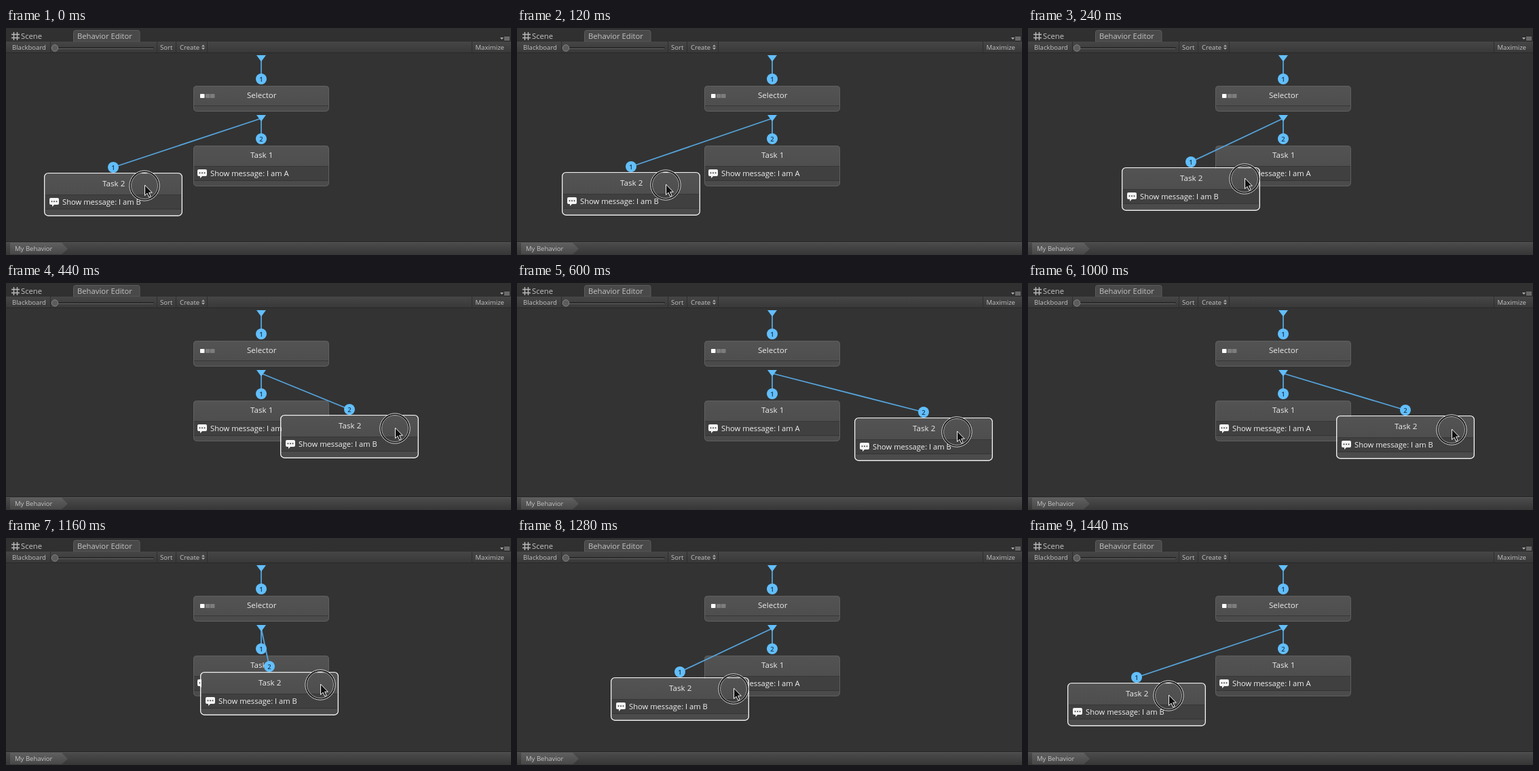
An HTML page for the animation above (1.48 s loop, 744 by 334 pixels).

```html
<!DOCTYPE html>
<html lang="en">
<head>
<meta charset="utf-8">
<title>Behavior Editor</title>
<style>
html, body { margin: 0; width: 100%; height: 100%; overflow: hidden; background: #333; }
svg { display: block; width: 744px; height: 334px; }
text { font-family: "Open Sans", "Noto Sans", sans-serif; fill: #c4c4c4; }
.tab { font-size: 11.25px; }
.bar { font-size: 9.55px; }
.title { font-size: 11.6px; fill: #ececec; text-anchor: middle; }
.msg { font-size: 11.2px; fill: #f0f0f0; }
.num { font-size: 9.5px; fill: #173a55; text-anchor: middle; font-weight: 600; }
.link { stroke: #55a4dc; stroke-width: 1.8; }
.blue { fill: #62bffc; }
</style>
</head>
<body>
<svg id="stage" viewBox="0 0 744 334">
  <defs>
    <linearGradient id="tool" x2="0" y2="1"><stop stop-color="#464646"/><stop offset="1" stop-color="#383838"/></linearGradient>
    <linearGradient id="foot" x2="0" y2="1"><stop stop-color="#4c4c4c"/><stop offset="1" stop-color="#363636"/></linearGradient>
    <linearGradient id="crumb" x2="0" y2="1"><stop stop-color="#606060"/><stop offset="1" stop-color="#484848"/></linearGradient>
    <linearGradient id="head" x2="0" y2="1"><stop stop-color="#535353"/><stop offset="1" stop-color="#4e4e4e"/></linearGradient>
  </defs>

  <rect width="744" height="334" fill="#333"/>

  <!-- tabs -->
  <rect width="744" height="20" fill="#303030"/>
  <path d="M99.500 20V6.500Q99.500 3.500 102.500 3.500H194Q197 3.500 197 6.500V20Z" fill="#494949" stroke="#5c5c5c"/>
  <path d="M11.500 6V18M16.500 6V18M8 9.500H20M8 14.500H20" stroke="#bababa" stroke-width="1.400"/>
  <text class="tab" x="22" y="16">Scene</text>
  <text class="tab" x="105" y="16">Behavior Editor</text>
  <path d="M728 14h5l-2.500 3z" fill="#b0b0b0"/>
  <path d="M734 13.500h8M734 15.500h8M734 17.500h8" stroke="#a0a0a0"/>

  <!-- toolbar -->
  <rect y="20" width="744" height="17" fill="url(#tool)"/>
  <path d="M0 36.500H744" stroke="#292929"/>
  <path d="M65.500 20V36M222.500 20V36M250.500 20V36M296.500 20V36M686.500 20V36" stroke="#2e2e2e"/>
  <rect x="67" y="28" width="151" height="2" rx="1" fill="#2b2b2b"/>
  <path d="M68 30.500H217" stroke="#606060"/>
  <circle cx="72" cy="29.500" r="4.700" fill="#5c5c5c" stroke="#868686"/>
  <text class="bar" x="9" y="32">Blackboard</text>
  <text class="bar" x="227" y="32">Sort</text>
  <text class="bar" x="256" y="32">Create</text>
  <path d="M288 27.500l2.500-3 2.500 3zM288 29h5l-2.500 3z" fill="#a8a8a8"/>
  <text class="bar" x="691.500" y="32">Maximize</text>

  <!-- breadcrumb -->
  <rect y="315" width="744" height="19" fill="url(#foot)"/>
  <path d="M0 314.500H744" stroke="#262626"/>
  <path d="M0 315.500H744" stroke="#555"/>
  <path d="M6 316H82L91 325 82 333H6Z" fill="url(#crumb)"/>
  <text class="bar" x="13" y="328">My Behavior</text>

  <g id="graph"></g>
</svg>
<script>
const LOOP = 1480, STEP = 40, TURN = 760;
const ROOT = { x: 376, y: 133 };
const graph = document.getElementById("graph");

// Drag out; the way back mirrors it. Columns: time, value.
const nodeX = track([[0, 158], [80, 160], [240, 240], [400, 446], [440, 506], [520, 556], [560, 586], [600, 599], [680, 601], [TURN, 601]]);
const nodeY = track([[0, 215], [80, 215], [240, 207], [440, 196], [520, 197], [600, 200], [TURN, 200]]);
const handX = track([[0, 204], [80, 207], [240, 319], [400, 517], [440, 573], [520, 624], [600, 648], [TURN, 649]]);
const handY = track([[0, 232], [80, 232], [240, 222], [440, 214], [520, 216], [600, 219], [TURN, 219]]);

// Monotone cubic interpolation through a few points.
function track(pts) {
  const rise = pts.slice(1).map((p, i) => (p[1] - pts[i][1]) / (p[0] - pts[i][0]));
  const slope = pts.map((p, i) => {
    const a = rise[i - 1], b = rise[i];
    return a * b > 0 ? 2 * a * b / (a + b) : 0;
  });
  return t => {
    let i = 0;
    while (i < pts.length - 2 && t > pts[i + 1][0]) i++;
    const [t0, a] = pts[i], [t1, b] = pts[i + 1];
    const d = t1 - t0, s = (t - t0) / d, r = 1 - s;
    return a * r * r * (1 + 2 * s) + b * s * s * (3 - 2 * s)
      + d * s * r * (slope[i] * r - slope[i + 1] * s);
  };
}

function el(parent, tag, attrs, text) {
  const e = document.createElementNS("http://www.w3.org/2000/svg", tag);
  for (const k in attrs) e.setAttribute(k, attrs[k]);
  if (text) e.textContent = text;
  return parent.appendChild(e);
}

const place = (e, x, y) => e.setAttribute("transform", `translate(${x} ${y})`);
const group = (x, y) => {
  const g = el(graph, "g", {});
  place(g, x, y);
  return g;
};

function link(x1, y1, x2, y2) {
  return el(graph, "line", { class: "link", x1, y1, x2, y2 });
}

function arrow(y) {
  el(graph, "path", { class: "blue", d: `M369 ${y}h14l-7 9.500z` });
}

function badge(x, y, n) {
  const g = group(x, y);
  el(g, "circle", { class: "blue", r: 8 });
  g.label = el(g, "text", { class: "num", y: 3.5 }, n);
  return g;
}

// Node origin is the middle of its top edge.
function node(x, y, title, message, selected) {
  const g = group(x, y);
  const h = message ? 60 : 38, head = message ? 30 : 29, foot = h - 8;
  el(g, "rect", { x: -100, width: 200, height: h, rx: 5, fill: "#4b4b4b" });
  el(g, "path", { d: `M-100 ${head}V5Q-100 0 -95 0H95Q100 0 100 5V${head}Z`, fill: "url(#head)" });
  if (message) {
    el(g, "rect", { x: -100, y: head, width: 200, height: foot - head, fill: "#404040" });
    el(g, "path", { d: `M-100 ${foot - .5}H100`, stroke: "#343434" });
    el(g, "path", { d: "M-92 35H-82Q-80 35-80 37V43Q-80 45-82 45H-87L-90 48V45H-92Q-94 45-94 43V37Q-94 35-92 35Z", fill: "#f4f4f4" });
    for (const cx of [-90.5, -87, -83.5]) el(g, "circle", { cx, cy: 40.2, r: 1, fill: "#404040" });
    el(g, "text", { class: "msg", x: -75, y: 45 }, message);
  } else {
    [-90, -82, -75].forEach((x, i) =>
      el(g, "rect", { x, y: 12, width: 6.5, height: 6, rx: .8, fill: i ? "#7d7d7d" : "#fff" }));
  }
  el(g, "path", { d: `M-100 ${head + .5}H100`, stroke: "#363636" });
  el(g, "text", { class: "title", x: .7, y: 18 }, title);
  el(g, "rect", selected
    ? { x: -101.3, y: -1.4, width: 202.6, height: 62.6, rx: 5.5, fill: "none", stroke: "#f0f0f0", "stroke-width": 1.4 }
    : { x: -99.5, y: .5, width: 199, height: h - 1, rx: 5, fill: "none", stroke: "#606060" });
  return g;
}

function pointer() {
  const g = group(0, 0);
  const ring = (r, stroke, w) => el(g, "circle", { r, fill: "none", stroke, "stroke-width": w });
  ring(20.8, "#1c1c1c", 3);
  ring(22.2, "#d8d8d8", 1);
  ring(19.5, "#b4b4b4", .9);
  el(g, "path", { d: "M.5-1V14.500L4 11.200 6.700 17 9.200 15.900 6.700 10.200H11.300Z", fill: "#111", stroke: "#f0f0f0", "stroke-width": 1 });
  return g;
}

node(376, 85, "Selector");
node(376, 173, "Task 1", "Show message: I am A");
link(376, 44, 376, 75);
link(ROOT.x, ROOT.y, 376, 163);
const wire = link(ROOT.x, ROOT.y, 158, 205);
arrow(40);
arrow(128);
badge(376, 75, "1");
const still = badge(376, 163, "2");
const moving = badge(158, 205, "1");
const task = node(158, 215, "Task 2", "Show message: I am B", true);
const hand = pointer();

function draw(time) {
  const t = Math.floor(time % LOOP / STEP) * STEP;
  const u = Math.min(t, 2 * TURN - t);
  const x = Math.round(nodeX(u)), y = Math.round(nodeY(u));
  const first = x < ROOT.x;
  place(task, x, y);
  place(moving, x, y - 10);
  place(hand, Math.round(handX(u)), Math.round(handY(u)));
  wire.setAttribute("x2", x);
  wire.setAttribute("y2", y - 10);
  moving.label.textContent = first ? "1" : "2";
  still.label.textContent = first ? "2" : "1";
}

const start = performance.now();
function tick() {
  draw(performance.now() - start);
  requestAnimationFrame(tick);
}
tick();
</script>
</body>
</html>
```
